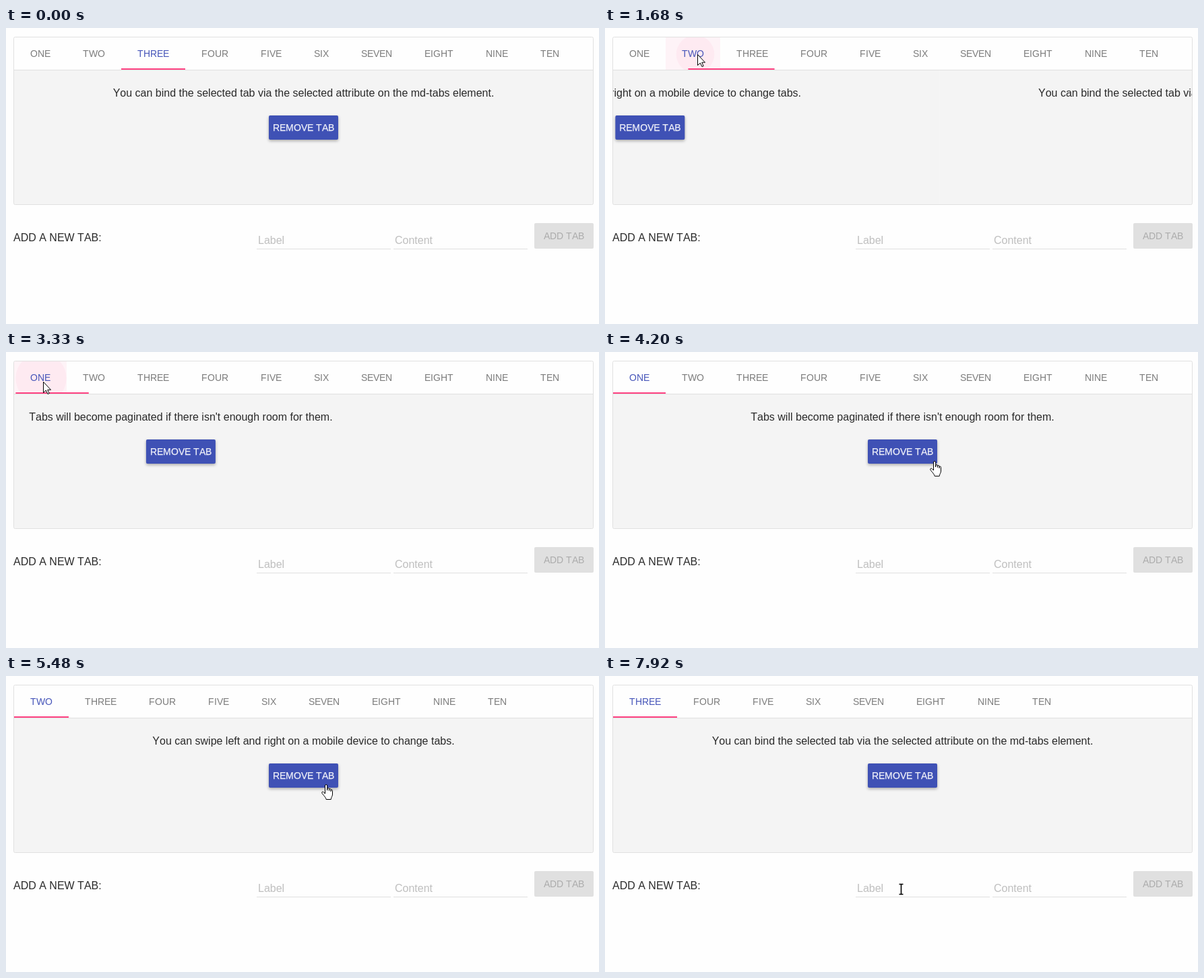
An HTML page for the animation above (8 s loop, 880x440 px).

```html
<!DOCTYPE html>
<html lang="en">
<head>
<meta charset="utf-8">
<title>Dynamic tabs</title>
<style>
  html, body { margin: 0; width: 100%; height: 100%; overflow: hidden; background: #fefefe; }
  svg { display: block; }
  text { font: 16px "Liberation Sans", Arial, sans-serif; fill: #2a2a2a; font-kerning: none; white-space: pre; }
  .small { font-size: 14px; }
  .tab { fill: #7c7c7c; }
  .tab.on { fill: #4655b9; }
  .hint { fill: #bfbfbf; }
  .off { fill: #acacac; }
  .mid { text-anchor: middle; }
  .caption { fill: #f0f1f9; stroke: #f0f1f9; stroke-width: .25; }
  .button { fill: #3f51b5; filter: drop-shadow(0 2px 2px rgba(0, 0, 0, .3)); }
  .line { fill: none; stroke: #e0e0e0; }
  .cursor { fill: #fff; stroke: #000; stroke-linejoin: round; }
</style>
</head>
<body>
<svg width="880" height="440">
  <svg id="ripple" y="14" height="48">
    <rect width="100" height="48" fill="#ff4081" opacity=".06"/>
    <circle cy="25" fill="#ff4081" opacity=".05"/>
  </svg>
  <g id="tabs"></g>
  <svg id="pages" x="12" y="63" width="859" height="199"></svg>
  <rect class="line" x="11.5" y="13.5" width="860" height="249" rx="2"/>
  <path class="line" d="M12 62.5H871M372 328.5H571M575 328.5H774"/>
  <rect id="ink" y="60" height="2" fill="#ff4081"/>
  <text x="11" y="317">ADD A NEW TAB:</text>
  <text class="hint" x="374" y="321">Label</text>
  <text class="hint" x="577" y="321">Content</text>
  <rect x="784" y="290" width="88" height="38" rx="2" fill="#e0e0e0"/>
  <text class="small off" x="798" y="314">ADD TAB</text>
  <g id="cursor" class="cursor">
    <path id="arrow" d="M.5 .5V16.5L4.3 13 7 18.5 9.2 17.5 6.7 12.2H11.5Z"/>
    <path id="hand" transform="translate(-7)" d="M5.5 14V2a1.6 1.5 0 0 1 3.2 0V9V7a1.4 1.4 0 0 1 2.8 0V9.5V8a1.3 1.4 0 0 1 2.6 0V10.5V9.2a1.2 1.2 0 0 1 2.4 .2V15C16.5 18 14.5 19 14.2 22.5H7.2C7 20 4.5 18 1 13.3C-.1 11.5 2 10.2 3.4 11.6Z"/>
    <path id="beam" stroke-width="1.6" d="M-2.5 -7.5H3.5M.5 -7.5V7.5M-2.5 7.5H3.5"/>
  </g>
</svg>
<script>
const $ = id => document.getElementById(id);
const LOOP = 8000, PAGE = 859, PAD = 24;
const names = ["ONE", "TWO", "THREE", "FOUR", "FIVE", "SIX", "SEVEN", "EIGHT", "NINE", "TEN"];
const messages = [
  "Tabs will become paginated if there isn't enough room for them.",
  "You can swipe left and right on a mobile device to change tabs.",
  "You can bind the selected tab via the selected attribute on the md-tabs element."
];

// Each click selects a tab; "gone" counts the tabs removed so far.
const tabClick = { select: 18, slide: 18, ink: 102 };
const removeClick = { select: 120, slide: 178, ink: 220 };
const steps = [
  { click: -LOOP, sel: 2, gone: 0, ...tabClick },
  { click: 1530, sel: 1, gone: 0, ...tabClick },
  { click: 3130, sel: 0, gone: 0, ...tabClick },
  { click: 4890, sel: 1, gone: 1, ...removeClick },
  { click: 7010, sel: 2, gone: 2, ...removeClick }
];

// Pointer moves: start, end, x, y; it rests in between.
const moves = [
  [530, 530, 138, 417], [530, 670, 161, 70], [950, 1130, 137, 39], [2080, 2250, 79, 41],
  [2400, 2690, 55, 44], [3560, 3850, 498, 162], [4120, 4320, 475, 161], [5750, 5930, 469, 155],
  [6420, 6510, 466, 156], [7580, 7750, 421, 331], [7800, 7915, 439, 317]
];

const clamp = v => Math.min(1, Math.max(0, v));
const mix = (a, b, k) => a + (b - a) * k;
const set = (el, attrs) => { for (const k in attrs) el.setAttribute(k, attrs[k]); };

// Small capitals sit on whole-pixel advances.
const pen = document.createElement("canvas").getContext("2d");
pen.font = '14px "Liberation Sans", Arial, sans-serif';
const advance = c => Math.round(pen.measureText(c).width);
const measure = word => [...word].reduce((sum, c) => sum + advance(c), 0);
const letters = (word, x) => [...word].map((c, i) => x + measure(word.slice(0, i))).join(" ");

$("tabs").innerHTML = names.map(n => `<text class="small tab" y="43">${n}</text>`).join("");
$("pages").innerHTML = messages.map(m => `<g>
  <rect width="${PAGE}" height="199" fill="#f4f4f4"/>
  <text class="mid" x="429.5" y="39">${m}</text>
  <rect class="button" x="378" y="67" width="103" height="36" rx="2"/>
  <text class="small caption" x="384" y="90">REMOVE TAB</text>
</g>`).join("") + `<svg x="378" y="67" width="103" height="36">
  <circle id="press" fill="#fff" opacity=".2"/></svg>`;
for (const el of document.querySelectorAll(".small[x]"))
  set(el, { x: letters(el.textContent, +el.getAttribute("x")) });
const tabs = [...$("tabs").children], pages = [...$("pages").querySelectorAll("g")];

// cubic-bezier(.35, 0, .25, 1), solved by bisection
function ease(v) {
  let lo = 0, hi = 1;
  v = clamp(v);
  while (hi - lo > 1e-5) {
    const s = (lo + hi) / 2;
    const x = 1.05 * s * (1 - s) ** 2 + .75 * s * s * (1 - s) + s ** 3;
    if (x < v) lo = s; else hi = s;
  }
  const s = v < 1 ? lo : 1;
  return s * s * (3 - 2 * s);
}

function bounds(i, gone) {
  const left = names.slice(gone, i).reduce((x, n) => x + measure(n) + 2 * PAD, 12);
  return [left, left + measure(names[i]) + 2 * PAD];
}

function pointer(t) {
  let [, , x, y] = moves[0];
  for (const [start, end, toX, toY] of moves.slice(1)) {
    const k = clamp((t - start) / (end - start));
    x = mix(x, toX, k);
    y = mix(y, toY, k);
  }
  return [x, y];
}

function drawTabs({ sel, gone }) {
  tabs.forEach((tab, i) => {
    tab.style.display = i < gone ? "none" : "";
    tab.classList.toggle("on", i === sel);
    if (i >= gone) set(tab, { x: letters(names[i], bounds(i, gone)[0] + PAD) });
  });
}

function drawInk(t) {
  let [left, right] = bounds(steps[0].sel, 0);
  for (const { click, ink, sel, gone } of steps.slice(1)) {
    const age = t - click - ink, [l, r] = bounds(sel, gone);
    left = mix(left, l, ease(age / 125));
    right = mix(right, r, ease(age / 250));
  }
  set($("ink"), { x: left, width: right - left });
}

function drawPages(t, step, prev) {
  const k = ease((t - step.click - step.slide) / 350);
  const from = step.sel < prev.sel ? -PAGE : PAGE;
  const kept = step.gone === prev.gone;
  const offsets = pages.map((_, i) =>
    i === step.sel ? from * (1 - k) : i === prev.sel && kept ? -from * k : PAGE);
  pages.forEach((p, i) => set(p, { transform: `translate(${offsets[i]})` }));
  return offsets;
}

function drawClick(t, [x, y]) {
  const { click, sel, gone } = steps.findLast(s => t >= s.click);
  const age = t - click, [left, right] = bounds(sel, gone);
  set($("ripple"), {
    x: left, width: right - left,
    opacity: gone ? 0 : clamp(age / 100) * clamp((620 - age) / 400)
  });
  set($("ripple").lastElementChild, { cx: x - left - 3, r: Math.min(110, age * .187) });
  set($("press"), { cx: x - 390, cy: y - 130, r: gone && age < removeClick.select ? 6 + age * .35 : 0 });
}

function drawPointer(t, [x, y], { sel, gone }, offsets) {
  const onTab = y > 14 && y < 62 && names.some((_, i) => {
    const [l, r] = bounds(i, gone);
    return i >= gone && i !== sel && x >= l && x < r;
  });
  const onButton = y >= 130 && y < 166 && offsets.some(v => x >= 390 + v && x < 493 + v);
  const onInput = y > 298 && y < 329 && x > 372 && x < 571;
  const kind = onInput ? "beam" : onTab || onButton ? "hand" : "arrow";
  for (const id of ["arrow", "hand", "beam"]) $(id).style.display = id === kind ? "" : "none";
  $("cursor").style.display = t < moves[0][0] ? "none" : "";
  set($("cursor"), { transform: `translate(${Math.round(x)} ${Math.round(y)})` });
}

function frame(now) {
  const t = now % LOOP, at = pointer(t);
  const n = steps.findLastIndex(s => t >= s.click + s.select);
  const step = steps[n], prev = steps[Math.max(0, n - 1)];
  drawTabs(step);
  drawInk(t);
  drawClick(t, at);
  drawPointer(t, at, step, drawPages(t, step, prev));
  requestAnimationFrame(frame);
}
requestAnimationFrame(frame);
</script>
</body>
</html>
```
